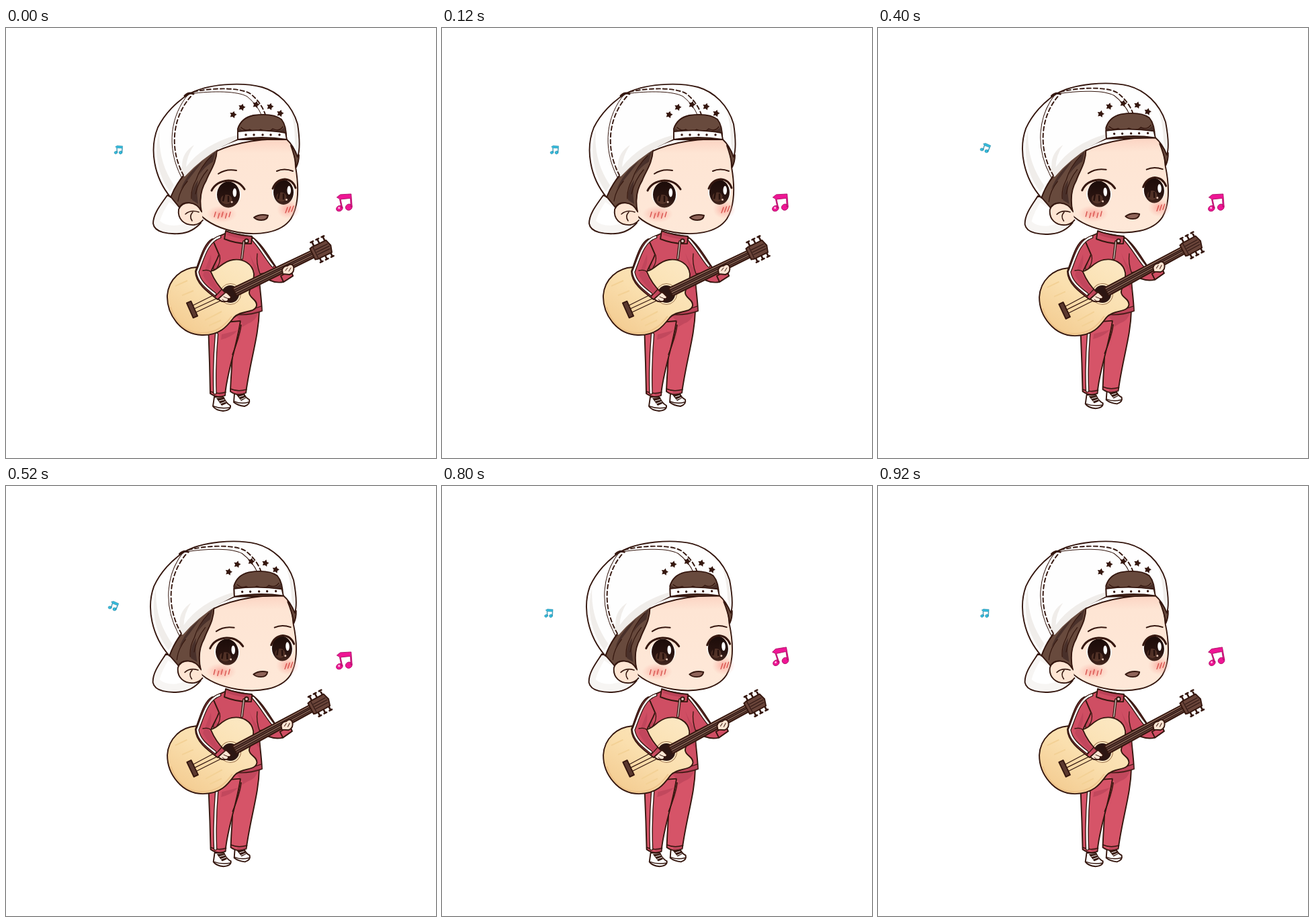
Write an HTML page that moves like this. It is 640 by 640 pixels and loops after 1 s.

```html
<!DOCTYPE html>
<html lang="en">
<head>
<meta charset="utf-8">
<title>Guitar player</title>
<style>
  html, body { margin: 0; width: 100%; height: 100%; overflow: hidden; background: #fff; }
  svg { display: block; width: 100vw; height: 100vh; }
  .ink { stroke: #35170f; stroke-width: 1.9; stroke-linejoin: round; stroke-linecap: round; }
  .line { fill: none; stroke: #35170f; stroke-linecap: round; stroke-linejoin: round; }
  .red { fill: #d65468; }
  .coat { fill: #cf4e63; }
  .deep { fill: #b03c53; }
  .skin { fill: #fee5d3; }
  .hair { fill: #684a3d; }
  .white { fill: #fefefe; }
</style>
</head>
<body>
<svg viewBox="0 0 640 640">
  <defs>
    <linearGradient id="wood" x1="1" y1="0" x2="0.2" y2="1">
      <stop offset="0" stop-color="#fce9c6"/><stop offset=".55" stop-color="#fadfae"/><stop offset="1" stop-color="#f3cb90"/>
    </linearGradient>
    <linearGradient id="face" x1="0" y1="0" x2="0" y2="1">
      <stop offset="0" stop-color="#fcd3c2"/><stop offset=".15" stop-color="#fee5d4"/><stop offset="1" stop-color="#fee8d8"/>
    </linearGradient>
    <radialGradient id="blush">
      <stop offset="0" stop-color="#f99c91" stop-opacity=".8"/><stop offset="1" stop-color="#fbb5a8" stop-opacity="0"/>
    </radialGradient>
    <linearGradient id="iris" x1="0" y1="0" x2="0" y2="1">
      <stop offset="0" stop-color="#1c0c09"/><stop offset=".7" stop-color="#2b1511"/><stop offset="1" stop-color="#45281f"/>
    </linearGradient>
    <g id="note">
      <ellipse cx="-8.500" cy="8" rx="5" ry="4" transform="rotate(-15 -8.500 8)"/>
      <ellipse cx="5.500" cy="9" rx="5" ry="4.500" transform="rotate(-15 5.500 9)"/>
      <path d="M-9-9L-3-12L13-9.500L10.500 9H8.500L10.500-3.500L-4-5L-4 8H-5.500L-5.500-6Z"/>
    </g>
  </defs>

  <g id="legs">
    <path class="ink white" d="M310 549L324 550Q327 558 334 562Q335 569 323 570Q312 569 308 563Z"/>
    <path fill="#35170f" d="M313 551L324 551L328 559L321 562Z"/>
    <path class="line" stroke-width="1.500" d="M309 563Q319 567 333 565"/>
    <path stroke="#fff" d="M317 555L325 553M319 559L327 556"/>
    <path class="ink white" d="M340 544L354 544Q356 550 362 553Q364 560 355 563Q345 562 339 557Z"/>
    <path fill="#35170f" d="M343 546L354 545L357 551L350 555Z"/>
    <path class="line" stroke-width="1.500" d="M340 556Q350 560 361 557"/>
    <path stroke="#fff" d="M347 549L354 547M349 553L356 550"/>
    <path class="ink red" d="M334 425L377 420C376 460 364 492 357 543Q345 549 334 541C335 505 339 488 336 455Z"/>
    <path class="ink red" d="M301 440L303 500L304 544Q315 552 326 547C328 515 342 480 349 436Z"/>
    <path class="deep" opacity=".5" d="M375 424Q372 436 360 440L350 446L346 474Q350 450 352 440L342 428ZM321 456L345 450Q336 460 320 464ZM344 539L356 538L357 543L343 545ZM317 542L326 541V546L317 548Z"/>
    <path class="line" stroke-width="1.600" d="M350 442Q347 462 337 486M304 541Q316 546 327 542M334 537Q345 542 358 538"/>
    <path class="line" stroke-width="5.500" d="M313.500 456C311 485 310 515 311 543"/>
    <path class="line" style="stroke:#fff" stroke-width="2.800" d="M313.500 456C311 485 310 515 311 543"/>
  </g>

  <path class="ink coat" d="M330 304C318 310 306 313 301 322L312 372L340 426Q362 428 381 421C380 398 377 385 377 369L404 359C392 342 380 320 366 311Z"/>
  <path class="deep" opacity=".5" d="M362 335Q368 350 376 360L378 392L370 380V360ZM340 419Q362 422 380 414L381 421Q362 428 341 426ZM304 340Q312 345 316 356L308 362Z"/>
  <path class="line" stroke-width="1.300" d="M374 336Q372 350 378 366M354 419Q368 419 380 414M318 338Q320 348 314 357"/>
  <path class="line" stroke-width="5" d="M368 315C380 328 387 342 397 354"/>
  <path class="line" style="stroke:#fff" stroke-width="2.400" d="M368 315C380 328 387 342 397 354"/>
  <path class="ink coat" d="M327 302Q345 309 366 310L365 321Q345 322 325 314Z"/>
  <path class="deep" opacity=".6" d="M330 304Q345 309 365 311L364 315Q345 314 329 308Z"/>
  <path class="line" stroke-width="4" d="M354 318L351 343"/>
  <path class="line" style="stroke:#c9b5b0" stroke-width="1.600" d="M354 318L351 343"/>
  <circle class="ink" fill="#e9d9d2" cx="358" cy="317" r="2.800"/>

  <g id="body">
    <path class="ink" fill="url(#wood)" d="M284 356C262 357 242 373 240 398C239 426 260 456 291 457C318 458 329 444 339 431C350 419 371 425 373 413C374 404 362 402 362 394C362 387 369 382 369 366C367 350 352 343 338 345C323 347 318 358 308 361C298 364 292 357 284 356Z"/>
    <path fill="none" stroke="#e9bb80" stroke-width="2" opacity=".6" d="M245 415C252 439 268 454 291 454C314 454 326 442 336 429"/>
    <path fill="none" stroke="#f3d196" stroke-width="2" d="M252 384L270 376M262 398L279 391M296 435L321 422M302 443L320 435"/>
    <path class="line" stroke-width="1.200" d="M278 413L328 388M280 418L332 394M283 423L334 399"/>
    <rect class="ink" fill="#5b3930" x="-3.500" y="-12" width="7" height="24" transform="translate(277 419) rotate(-24)"/>
    <circle cx="334" cy="396" r="15.500" fill="#fbe8c2" stroke="#a0764f"/>
    <circle cx="334" cy="396" r="13" fill="#2d1613"/>
  </g>

  <g id="neck">
    <path class="ink coat" d="M379 366C390 377 402 380 413 378L427 369L422 356L400 363Z"/>
    <path class="ink coat" d="M413 378L427 369L424 361L409 369Z"/>
    <g transform="translate(334 396) rotate(-25.900)">
      <path class="ink" fill="#5d3c33" d="M7-6.500L138-5.500V5.500L7 6.500Z"/>
      <path stroke="#2f1814" stroke-width="1.200" d="M7-3L138-2.500M7 0H138M7 3L138 2.500"/>
      <path stroke="#b28d78" stroke-width=".7" d="M8-4.800L138-4M8 1.500H138"/>
      <path id="pegs" class="line" stroke-width="2.600"/>
      <path class="ink" fill="#694439" d="M136-9L140-10H163L166 0L163 10H140L136 9Z"/>
      <path stroke="#331a16" stroke-width="1.200" d="M141-9V9M142-4H163M142 0H164M142 4H163"/>
    </g>
    <path class="ink skin" d="M412 366L411 360Q413 354 419 354Q425 349 428 355Q430 364 422 367Z"/>
    <path class="line" stroke-width="1" d="M416 361L419 357M421 362L424 357"/>
  </g>

  <path class="ink skin" d="M312 398Q319 390 329 394L335 400Q334 404 331 403Q331 408 326 407Q319 409 312 398Z"/>
  <path class="line" stroke-width="1" d="M324 400L331 403M322 404L326 407"/>
  <path class="ink coat" d="M307 314C294 321 289 344 282 362C282 380 300 393 315 404L326 394C316 384 309 373 305 363C309 353 314 346 317 337Z"/>
  <path class="deep" opacity=".45" d="M305 337Q307 350 301 361L314 385L326 394L320 399Q302 384 293 368Z"/>
  <path class="line" stroke-width="1.300" d="M305 363Q301 359 293 361M311 400L321 389"/>
  <path class="line" stroke-width="5" d="M318 311C298 318 293 344 285 363C287 377 298 386 311 396"/>
  <path class="line" style="stroke:#fff" stroke-width="2.400" d="M318 311C298 318 293 344 285 363C287 377 298 386 311 396"/>

  <g id="head">
    <path class="ink" fill="#f7f5f3" d="M240 249C231 262 219 276 219 291C221 305 243 307 258 306C273 305 282 299 290 290L262 258Z"/>
    <path fill="#fff" d="M243 259Q233 274 229 287Q236 294 250 294Q264 293 276 288L256 268Z"/>
    <path class="ink" fill="url(#face)" d="M300 190Q345 164 420 165Q431 182 431 207C435 230 437 263 424 284C409 306 373 309 345 304C318 299 300 290 288 277L290 240Z"/>
    <path class="ink hair" d="M245 251C257 220 288 194 314 181C313 203 303 213 298 227C290 240 287 254 291 274C280 257 264 257 258 267Z"/>
    <path fill="#49302a" d="M312 183Q295 199 287 219Q296 206 308 199ZM293 198Q270 215 260 240Q276 220 293 198ZM286 226Q275 240 277 256L286 262Q283 242 286 226Z"/>
    <path class="line" stroke-width="1.200" d="M306 190Q289 207 283 226Q275 240 276 254M300 211Q287 226 282 247M270 228Q258 242 256 258"/>
    <path class="ink hair" d="M424 175L436 189Q436 199 432 207Q430 191 424 175Z"/>
    <path class="ink skin" d="M291 273C283 257 262 256 257 270C255 284 265 294 280 293Q288 292 293 286"/>
    <path class="line" stroke-width="1.600" d="M267 277Q275 270 287 274M278 274Q272 280 277 287"/>

    <ellipse cx="321" cy="277" rx="23" ry="13" fill="url(#blush)"/>
    <ellipse cx="420" cy="270" rx="17" ry="14" fill="url(#blush)"/>
    <path id="hatch" fill="none" stroke="#d9534f" stroke-width="1.400" stroke-linecap="round"/>

    <g id="eyes"></g>
    <path class="line" stroke-width="2" d="M316 217Q328 209 343 212M403 213Q414 208 427 213"/>
    <path class="ink" fill="#8f6459" d="M369 282Q378 276 390 279Q389 286 380 286Q373 286 369 282Z"/>

    <path class="ink white" d="M245 252C220 222 213 180 226 148C236 128 254 109 273 98C300 83 350 80 381 88C405 95 426 115 434 143C437 163 438 181 434 192Q428 175 418 166L345 166C301 181 262 209 245 252Z"/>
    <path fill="#f0edea" d="M229 151C219 183 225 217 244 244L250 234C234 210 226 183 229 151ZM256 209Q261 219 266 221Q290 195 323 176L345 165V159Q293 173 268 207Q269 190 280 174Q261 186 262 207ZM423 122Q430 140 430 172L434 186Q437 142 423 122Z"/>
    <path class="line" stroke-width="1" d="M271 99C246 129 237 176 261 222M273 98C310 93 345 94 359 102Q374 114 381 131"/>
    <path class="line" stroke-width="1.900" stroke-dasharray="6 4" d="M275 102C250 130 241 176 264 219M279 95C312 88 350 89 364 98Q380 111 386 129"/>
    <path class="line" stroke-width="3" d="M266 101Q272 95 279 98"/>
    <path class="ink hair" d="M345 165V150Q350 134 368 130Q397 126 410 136Q418 146 417 166Z"/>
    <path fill="#49302a" d="M347 149Q356 157 363 152Q371 159 379 152Q390 159 397 151Q406 157 415 147L416 157Q380 150 346 155Z"/>
    <path class="line" stroke-width="1.400" d="M350 148Q356 154 363 151Q371 157 379 151Q390 157 397 150Q406 155 412 147"/>
    <path class="ink white" d="M345 154Q380 150 416 156L418 166Q380 160 345 166Z"/>
    <g id="studs" fill="#35170f"></g>
  </g>

  <g id="pink" fill="#ef1595" stroke="#a90b60" stroke-width=".8"><use href="#note"/><circle cx="-9" cy="7" r="1.500" fill="#ffb7e1" stroke="none"/></g>
  <g id="blue" fill="#35bcdc" stroke="#176f8e" stroke-width=".8"><use href="#note"/></g>
</svg>
<script>
const $ = id => document.getElementById(id);
const set = (id, value) => $(id).setAttribute("transform", value);

function star(x, y, r) {
  const points = Array.from({ length: 10 }, (_, i) => {
    const a = i * Math.PI / 5 - 1.3, d = i % 2 ? r * .55 : r;
    return (x + d * Math.cos(a)).toFixed(1) + "," + (y + d * Math.sin(a)).toFixed(1);
  });
  return `<polygon points="${points.join(" ")}"/>`;
}

function eye(x, y, rx, ry, lash) {
  return `<ellipse cx="${x}" cy="${y}" rx="${rx + 2}" ry="${ry - 2}" fill="#fffaf6"/>
    <ellipse cx="${x}" cy="${y}" rx="${rx}" ry="${ry}" fill="url(#iris)"/>
    <ellipse cx="${x - 3}" cy="${y + 7}" rx="${rx * .5}" ry="7" fill="#6b4436" opacity=".6"/>
    <path d="M${x - 6} ${y}l-2 10M${x} ${y + 2}v9" stroke="#26110d" stroke-width="2.500"/>
    <ellipse cx="${x + rx * .55}" cy="${y - 3}" rx="2.800" ry="6.500" fill="#fff"/>
    <circle cx="${x + rx * .3}" cy="${y + 11}" r="1.500" fill="#e2c3b4"/>
    <path class="line" stroke-width="3" d="${lash}"/>`;
}

$("eyes").innerHTML =
  eye(331, 248, 17, 19.5, "M306 242Q313 228 331 227Q347 227 355 240") +
  eye(413, 244.5, 15, 18.5, "M397 239Q402 226 415 225Q427 226 431 238");
$("studs").innerHTML =
  [[338, 129], [351, 118], [372, 114], [393, 117], [408, 127]].map(([x, y]) => star(x, y, 5.5)).join("") +
  [357, 369, 382, 394, 407].map(x => `<circle cx="${x}" cy="159" r="1.700"/>`).join("");
$("pegs").setAttribute("d", [143, 152, 161].map(x =>
  `M${x}-9V-16M${x - 2}-17h4M${x} 9V15M${x - 2} 16h4`).join(""));
$("hatch").setAttribute("d",
  [0, 1, 2, 3, 4].map(i => `M${312 + i * 5.5} ${274 + i % 2 * 2}l-2 7`).join("") +
  [0, 1, 2].map(i => `M${419 + i * 4.5} ${267 - i}l-3 8`).join(""));

// head: [lean, lean axis y, tilt, tilt axis x, lift]
// legs: [height, sway]; pink and blue: [x, y, angle, size]
const poses = [
  { head: [0, 300, 0, 310, 0], legs: [1, 0], neck: 0, body: 0, pink: [503, 259, -12, 1], blue: [167.5, 181, -4, .5] },
  { head: [.024, 300, .012, 290, -1], legs: [.987, 0], neck: -1.1, body: 0, pink: [502.5, 249, 4, 1], blue: [160, 178, 15, .52] },
  { head: [.038, 300, .02, 310, -.5], legs: [.974, .005], neck: -2.5, body: -1.5, pink: [503, 259, -12, 1], blue: [160, 178, 15, .52] },
  { head: [.082, 248, .075, 322, 0], legs: [.972, .055], neck: -5.3, body: -1.5, pink: [503, 253, -18, 1], blue: [159, 210, -4, .5] }
];
poses.push({ ...poses[2], pink: poses[3].pink, blue: [159, 189, -4, .5] });

function placeNote(id, [x, y, angle, size]) {
  set(id, `translate(${x} ${y}) rotate(${angle}) scale(${size})`);
}

function draw(ms) {
  const pose = poses[Math.floor(ms % 1000 / 200)];
  const [lean, axisY, tilt, axisX, lift] = pose.head;
  const [height, sway] = pose.legs;
  set("head", `matrix(1 ${-tilt} ${lean} 1 ${-lean * axisY} ${tilt * axisX + lift})`);
  set("legs", `translate(0 424) matrix(1 0 ${sway} ${height} 0 0) translate(0 -424)`);
  set("neck", `rotate(${pose.neck} 334 396)`);
  set("body", `rotate(${pose.body} 334 396)`);
  placeNote("pink", pose.pink);
  placeNote("blue", pose.blue);
}

const start = performance.now();
function tick() {
  draw(performance.now() - start);
  requestAnimationFrame(tick);
}
draw(0);
requestAnimationFrame(tick);
</script>
</body>
</html>
```
